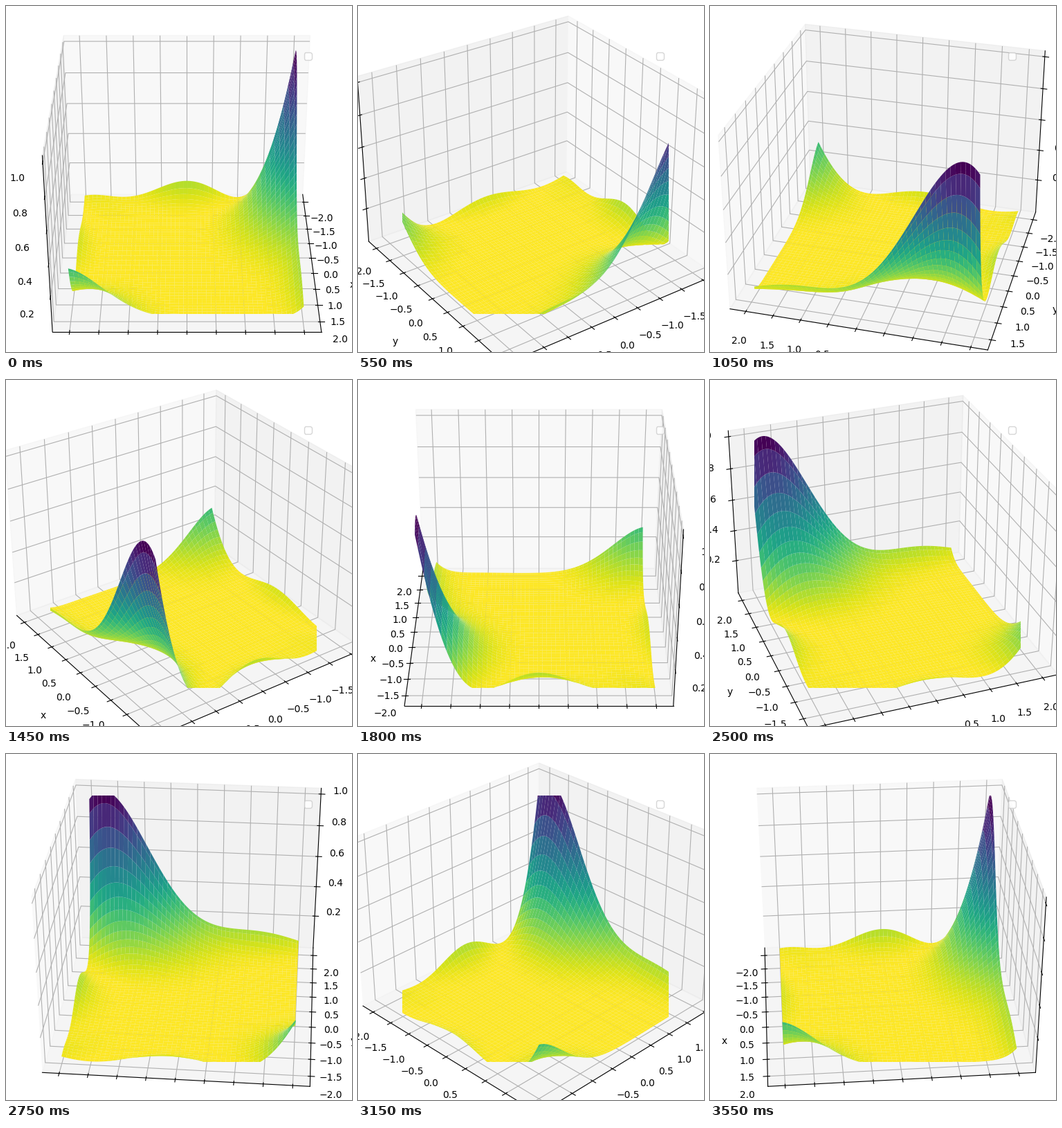
Animation of 500x500 px, one loop 3600 ms. Source, as a matplotlib script:

```python
import numpy as np
import matplotlib.pyplot as plt
from matplotlib.animation import FuncAnimation

FRAMES = 72
INTERVAL = 50
EDGE = 2.2 * 25 / 24  # half range of x and y, margins included


def surface(x, y):
    a = 1 + (x + y + 1)**2 * (19 - 14*x + 3*x**2 - 14*y + 6*x*y + 3*y**2)
    b = 30 + (2*x - 3*y)**2 * (18 - 32*x + 12*x**2 + 48*y - 36*x*y + 27*y**2)
    return a * b


axis = np.linspace(-2, 2, 100)
X, Y = np.meshgrid(axis, axis)
Z = surface(X, Y)

fig = plt.figure(figsize=(5, 5), dpi=100)
ax = fig.add_subplot(projection="3d")
ax.plot_surface(X, Y, Z, cmap="viridis_r")

ticks = np.arange(-2, 2.1, 0.5)
ax.set_xticks(ticks)
ax.set_yticks(ticks)
ax.set_zticks(np.arange(2, 11, 2) * 1e5)

pad = np.ptp(Z) / 48
ax.set_xlim(-EDGE, EDGE)
ax.set_ylim(-EDGE, EDGE)
ax.set_zlim(Z.min() - pad, Z.max() + pad)
ax.set_box_aspect(None, zoom=1.5)
ax.set_xlabel("x")
ax.set_ylabel("y")
ax.legend([], [])  # empty legend box


def update(frame):
    ax.view_init(elev=30, azim=frame * 360 / FRAMES)
    return []


anim = FuncAnimation(fig, update, frames=FRAMES, interval=INTERVAL,
                     init_func=lambda: update(0), repeat=True)
plt.show()
```
